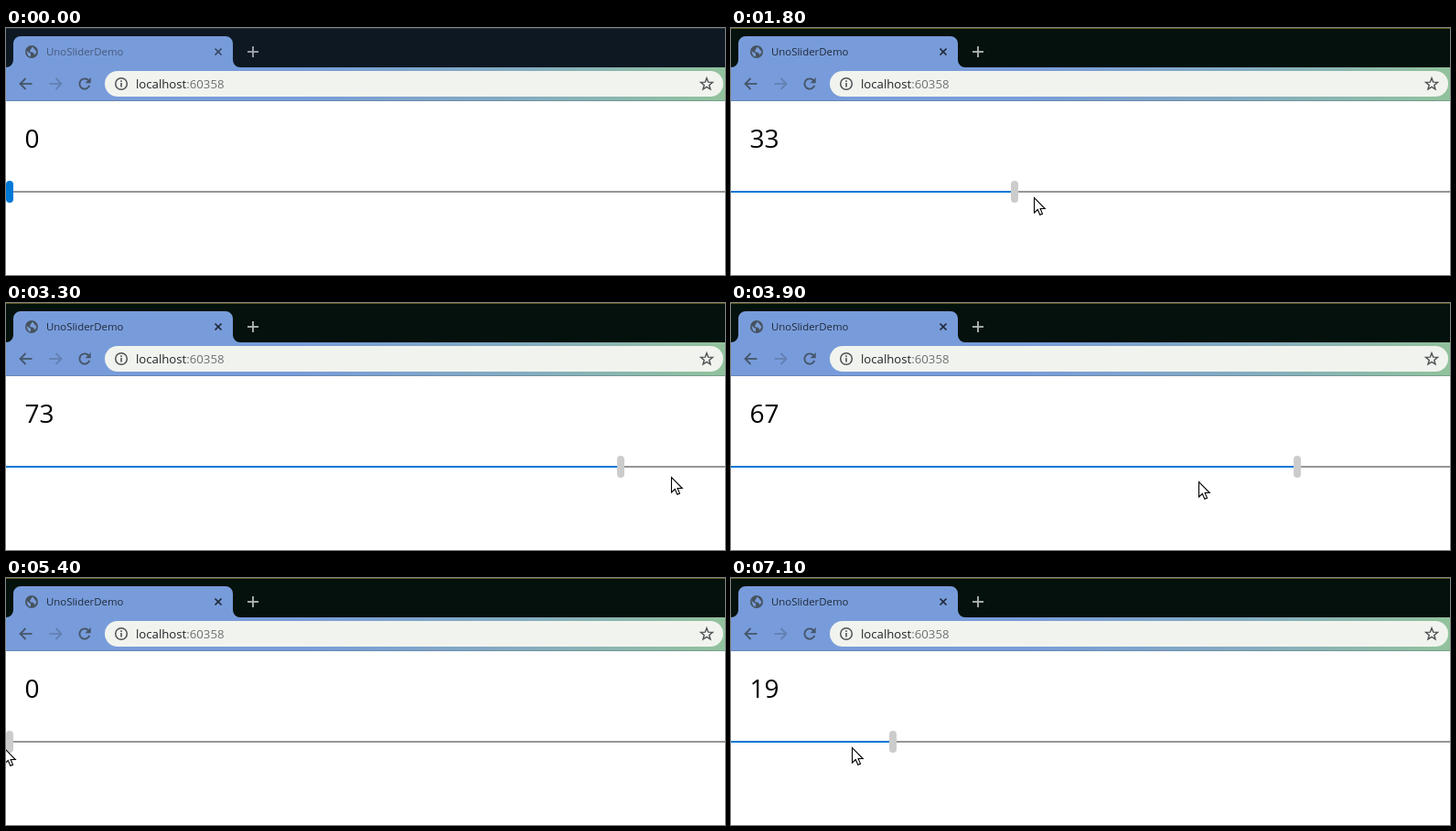
An HTML page with a canvas that plays this animation: 786 px wide and 270 px high, repeating every 7200 ms.

```html
<!DOCTYPE html>
<html lang="en">
<head>
<meta charset="utf-8">
<title>Slider demo</title>
<style>
html, body { margin: 0; width: 100%; height: 100%; overflow: hidden; background: #fff; }
canvas { display: block; }
</style>
</head>
<body>
<canvas id="stage" width="786" height="270"></canvas>
<script>
const ctx = document.getElementById('stage').getContext('2d');
const W = 786, H = 270, LOOP = 7200, STEP = 100;
const ENTER = 200, PRESS = 1300, LAG = 100, UNIT = 9.2;
const FONT = '"Open Sans", "Noto Sans", sans-serif';

// turning points of the hand: time, x
const turns = [
  [ENTER, 440], [1000, 4], [1200, 4], [1800, 332], [2450, 225], [3500, 776],
  [4510, -1], [4850, 160], [5200, -1], [5400, -1], [6450, 393], [7300, 94]
];

const clamp = (v, lo, hi) => Math.max(lo, Math.min(hi, v));
const mix = (a, b, u) => a + (b - a) * u;
const ease = u => (1 - Math.cos(Math.PI * clamp(u, 0, 1))) / 2;

function handX(t) {
  const i = Math.max(1, turns.findIndex(p => p[0] >= t));
  const [t0, x0] = turns[i - 1], [t1, x1] = turns[i];
  return mix(x0, x1, ease((t - t0) / (t1 - t0)));
}

// glides in along a slope, then sways slowly while dragging
function handY(t) {
  const glide = 178 + (handX(t) - 4) * 0.133;
  const sway = 185.3 + 10 * Math.pow(1 - ease(Math.abs(((t + 900) % 5000) / 2500 - 1) * -1 + 1), 3);
  return mix(glide, sway, ease((t - 1200) / 500));
}

function line(points, color, width, close) {
  ctx.beginPath();
  points.forEach(([x, y]) => ctx.lineTo(x, y));
  if (close) ctx.closePath();
  ctx.strokeStyle = color;
  ctx.lineWidth = width;
  ctx.stroke();
}

function shape(points, color) {
  ctx.beginPath();
  points.forEach(([x, y]) => ctx.lineTo(x, y));
  ctx.closePath();
  ctx.fillStyle = color;
  ctx.fill();
}

function ring(x, y, r, color, width, from = 0, to = Math.PI * 2) {
  ctx.beginPath();
  ctx.arc(x, y, r, from, to);
  ctx.strokeStyle = color;
  ctx.lineWidth = width;
  ctx.stroke();
}

function box(x, y, w, h, color, r = 0) {
  ctx.beginPath();
  ctx.roundRect(x, y, w, h, r);
  ctx.fillStyle = color;
  ctx.fill();
}

function text(s, x, y, size, color) {
  ctx.font = size + 'px ' + FONT;
  ctx.fillStyle = color;
  ctx.fillText(s, x, y);
  return ctx.measureText(s).width;
}

function globe(x, y) {
  const land = '#7a9dda';
  box(x - 7, y - 7, 14, 14, '#46535f', 7);
  shape([[x - 5.6, y - 1], [x - 1, y + 2], [x - 1, y + 5.6], [x - 4, y + 4]], land);
  shape([[x + 1, y - 5.6], [x + 5.5, y], [x + 3.5, y + 3.4], [x + 2, y + 1],
    [x - 1.8, y], [x - 1.5, y - 2]], land);
}

function tabStrip(active) {
  box(0, 0, W, 43, active ? '#04110c' : '#0d1822');
  box(0, 0, W, 1, active ? '#5c561f' : '#26333c');

  const bar = ctx.createLinearGradient(0, 0, W, 0);
  bar.addColorStop(0, '#789cdb');
  bar.addColorStop(0.4, '#789cda');
  bar.addColorStop(0.72, '#84acc0');
  bar.addColorStop(1, '#92c29c');
  box(0, 43, W, 37, bar);
  ctx.beginPath();
  ctx.moveTo(0, 43);
  ctx.arcTo(8, 43, 8, 35, 8);
  ctx.arcTo(8, 9, 16, 9, 8);
  ctx.arcTo(248, 9, 248, 17, 8);
  ctx.arcTo(248, 43, 256, 43, 8);
  ctx.fill();
  box(0, 79, W, 1, 'rgba(70,95,110,.35)');

  globe(28, 26);
  text('UnoSliderDemo', 44, 30, 11.4, active ? '#202a3a' : '#46597c');
  const cross = active ? '#1f2937' : '#38475f';
  line([[228.5, 22.5], [235.5, 29.5]], cross, 1.7);
  line([[235.5, 22.5], [228.5, 29.5]], cross, 1.7);
  const plus = active ? '#b4bab8' : '#a3a9ae';
  line([[264, 26], [276, 26]], plus, 1.8);
  line([[270, 20], [270, 32]], plus, 1.8);
}

function arrow(x, dir, color) {
  line([[x - 6.5 * dir, 61], [x + 6 * dir, 61]], color, 1.8);
  line([[x + dir * 0.5, 55], [x + 6.5 * dir, 61], [x + dir * 0.5, 67]], color, 1.8);
}

function toolbar() {
  const ink = '#46566a', gray = '#4d5154';
  arrow(22, -1, ink);
  arrow(54, 1, '#6380b2');
  ring(86, 61, 5.6, ink, 1.9, 0.35, 5.5);
  shape([[92.7, 54], [92.7, 60.2], [86.5, 60.2]], ink);

  box(108, 47, 676, 28, '#f1f4ee', 14);
  ring(126, 61, 6.3, gray, 1.5);
  box(125.2, 60, 1.6, 4.5, gray);
  box(125.2, 57.3, 1.6, 1.6, gray);
  const w = text('localhost', 142, 66, 13.2, '#202326');
  text(':60358', 142 + w, 66, 13.2, '#6b7073');

  const star = Array.from({ length: 10 }, (_, i) => {
    const a = i * Math.PI / 5 - Math.PI / 2, r = i % 2 ? 2.9 : 6.8;
    return [766 + r * Math.cos(a), 61.5 + r * Math.sin(a)];
  });
  line(star, gray, 1.4, true);
}

function slider(x, pressed) {
  text(String(Math.round((x - 4) / UNIT)), 20.5, 131.4, 28, '#000');
  box(0, 178, W, 2, '#969696');
  box(0, 178, x, 2, '#0078d7');
  box(x - 4, 167, 8, 24, pressed ? '#cccccc' : '#0078d7', 4);
}

function pointer(x, y) {
  const tip = [[0, 0], [0, 16.5], [3.8, 13], [6.3, 18.8], [9, 17.6], [6.6, 12], [11.8, 12]];
  const points = tip.map(([dx, dy]) => [x + dx - 0.5, y + dy + 0.5]);
  shape(points, '#fff');
  line(points, '#000', 1.1, true);
}

function draw(t) {
  const pressed = t >= PRESS;
  box(0, 0, W, H, '#fff');
  tabStrip(pressed);
  toolbar();
  slider(pressed ? clamp(Math.round(handX(t - LAG)), 4, W - 4) : 4, pressed);
  if (t >= ENTER) pointer(Math.round(handX(t)), Math.round(handY(t)));
}

const start = performance.now();
function frame() {
  const t = (performance.now() - start) % LOOP;
  draw(Math.floor(t / STEP) * STEP);
  requestAnimationFrame(frame);
}
frame();
</script>
</body>
</html>
```
